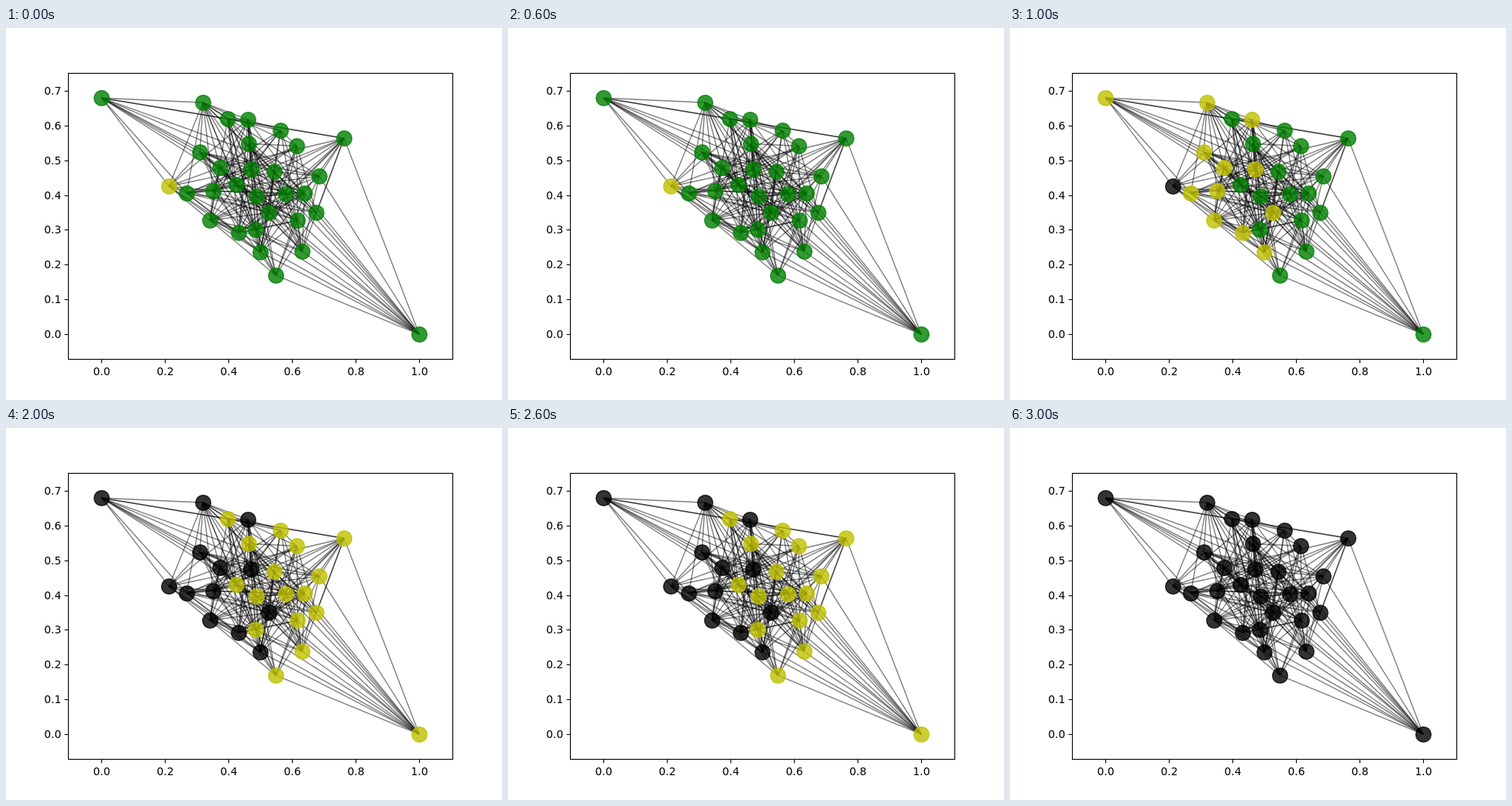
Write an HTML page that moves like this. It is 640 px wide and 480 px high and loops after 4000 ms.

```html
<!DOCTYPE html>
<html lang="en">
<head>
<meta charset="utf-8">
<title>Spread through a network</title>
<style>
  html, body { margin: 0; width: 100%; height: 100%; overflow: hidden; background: #fff; }
  svg { display: block; width: 640px; height: 480px; }
  text { font: 13.89px "DejaVu Sans", sans-serif; fill: #000; }
  .axis { fill: none; stroke: #000; stroke-width: 1.11; }
  .edge { stroke: #000; stroke-width: 1.39; stroke-opacity: .5; }
  .node { fill-opacity: .8; stroke-opacity: .8; stroke-width: 1.39; animation: 4s step-end infinite; }
  .ring0 { animation-name: first; }
  .ring1 { animation-name: second; }
  .ring2 { animation-name: third; }
  @keyframes first {
    0% { fill: #bfbf00; stroke: #bfbf00; }
    25%, 100% { fill: #000; stroke: #000; }
  }
  @keyframes second {
    0% { fill: #008000; stroke: #008000; }
    25% { fill: #bfbf00; stroke: #bfbf00; }
    50%, 100% { fill: #000; stroke: #000; }
  }
  @keyframes third {
    0% { fill: #008000; stroke: #008000; }
    50% { fill: #bfbf00; stroke: #bfbf00; }
    75%, 100% { fill: #000; stroke: #000; }
  }
</style>
</head>
<body>
<svg id="plot" viewBox="0 0 640 480"></svg>
<script>
  const plot = document.getElementById("plot");

  function add(tag, attrs, text) {
    const el = document.createElementNS("http://www.w3.org/2000/svg", tag);
    for (const key in attrs) el.setAttribute(key, attrs[key]);
    if (text) el.textContent = text;
    plot.appendChild(el);
  }

  // The start node, its twelve neighbours, then the rest; the far corner is last.
  const nodes = [
    [210, 204],
    [123, 90], [254, 96], [312, 118], [250, 160], [276, 180], [316, 182],
    [233, 213], [267, 210], [339, 238], [263, 248], [300, 264], [328, 289],
    [286, 117], [354, 132], [375, 152], [436, 142], [313, 149], [346, 185],
    [404, 191], [297, 202], [323, 217], [361, 214], [385, 213], [400, 238],
    [376, 248], [322, 260], [382, 288], [348, 319], [533, 395]
  ];
  const ringSize = 12;
  const corner = nodes.length - 1;

  let seed = 20;
  function random() {
    seed = (seed * 16807) % 2147483647;
    return seed / 2147483647;
  }

  function linked(a, b) {
    if (a === 0) return b <= ringSize;
    if (b === corner) {
      return Math.hypot(nodes[a][0] - nodes[b][0], nodes[a][1] - nodes[b][1]) < 285;
    }
    return random() < 0.46;
  }

  nodes.forEach(([x1, y1], a) => {
    for (let b = a + 1; b < nodes.length; b++) {
      const [x2, y2] = nodes[b];
      if (linked(a, b)) {
        add("line", { class: "edge", x1, y1, x2, y2, transform: "translate(.2 .2)" });
      }
    }
  });

  nodes.forEach(([x, y], i) => {
    const ring = i === 0 ? 0 : i <= ringSize ? 1 : 2;
    add("circle", { class: "node ring" + ring, cx: x + 0.5, cy: y + 0.5, r: 9.82 });
  });

  add("rect", { class: "axis", x: 80.5, y: 58.5, width: 496, height: 369 });
  for (let i = 0; i < 6; i++) {
    const x = 123 + 82 * i;
    add("path", { class: "axis", d: `M${x + 0.5} 427.5v4.9` });
    add("text", { x: x + 0.5, y: 448, "text-anchor": "middle" }, (i / 5).toFixed(1));
  }
  for (let i = 0; i < 8; i++) {
    const y = Math.round(395.15 - 44.9 * i);
    add("path", { class: "axis", d: `M80.5 ${y + 0.5}h-4.9` });
    add("text", { x: 71.3, y: y + 5, "text-anchor": "end" }, (i / 10).toFixed(1));
  }
</script>
</body>
</html>
```
